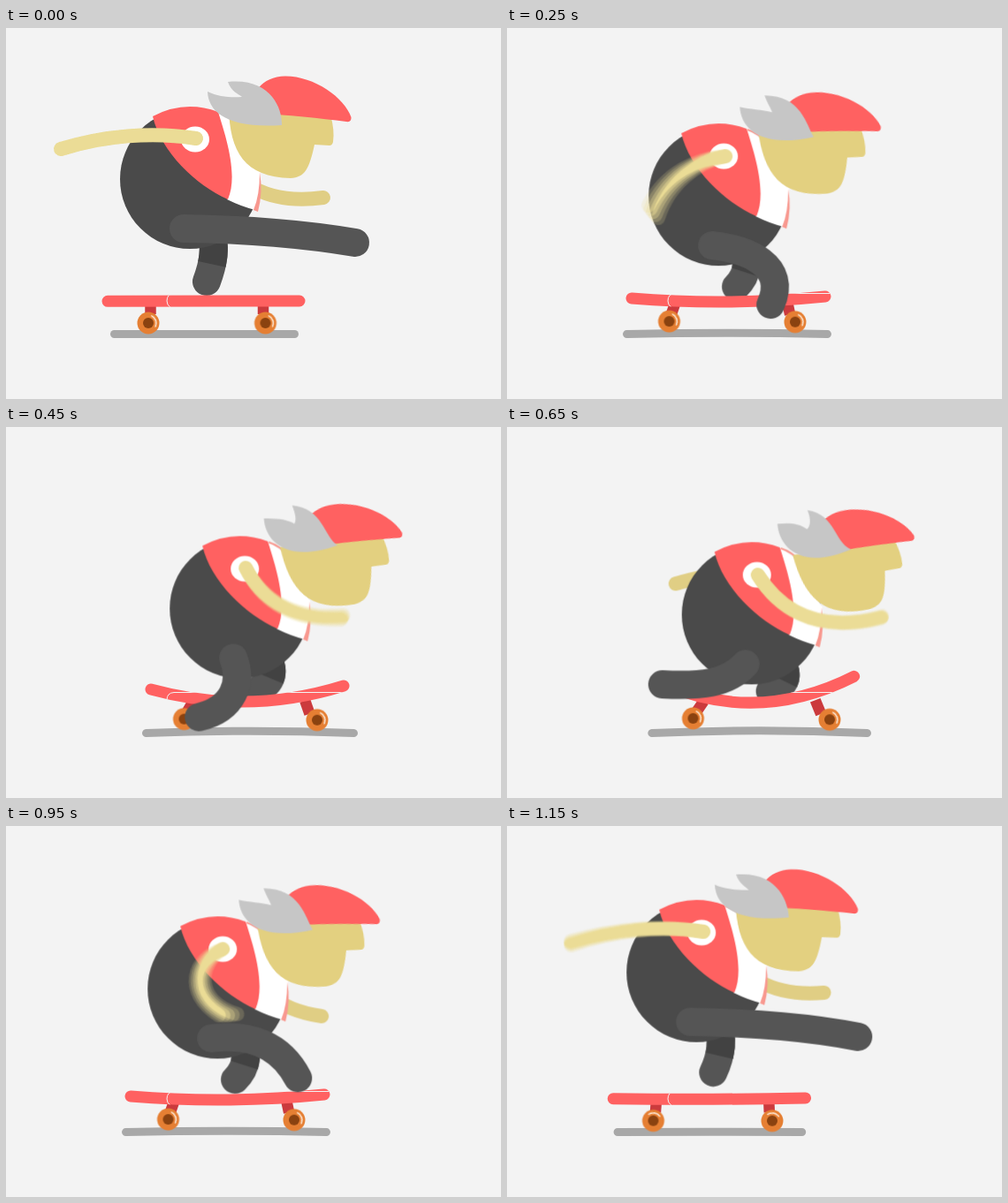
An HTML page without scripts for the animation above (1.2 s loop, 560x420 px).

```html
<!DOCTYPE html>
<html lang="en">
<head>
<meta charset="utf-8">
<title>Skater</title>
<style>
html, body { margin: 0; width: 100%; height: 100%; overflow: hidden; background: #f3f3f3; }
svg { display: block; width: 100%; height: 100%; }
.line { fill: none; stroke-linecap: round; }

/* Everything moves on a 50 ms beat: 12 beats out, 12 beats back. */
[class] { animation: 1.2s steps(12) -1ms infinite; }

.rig { animation-name: ride; }
@keyframes ride {
  0% { transform: translate(0, 0); }
  50% { transform: translate(75px, 46px); }
  100% { transform: translate(0, -10px); }
}

.head { animation-name: nod; transform-origin: 316px 87px; }
@keyframes nod {
  0%, 100% { transform: translateY(0) rotate(0deg); }
  50% { transform: translateY(-1.5px) rotate(-15deg); }
}

.hair { animation-name: hair; }
@keyframes hair {
  0%, 100% { d: path("M228,72 C229,95 250,114 312,110 C313,92 300,56 251,61 C255,72 262,74 267,78 C255,79 240,78 228,72Z"); }
  50% { d: path("M238,68 C240,95 265,122 321,96 C300,88 303,58 273,52 C277,62 276,70 271,74 C262,66 250,66 238,68Z"); }
}

.back-leg { animation-name: squat; }
@keyframes squat {
  0%, 100% { d: path("M232,230 C238,250 234,268 227,287"); }
  50% { d: path("M232,212 C254,232 252,250 229,255"); }
}

/* Copies spread by --k and added up give the arm its motion blur. */
.blur { isolation: isolate; }
.arm { animation-name: reach; transform-origin: 215px 126px; mix-blend-mode: plus-lighter; opacity: .2; }
@keyframes reach {
  0% { d: path("M215,125 C165,117 110,122 62,137"); transform: rotate(0deg); animation-timing-function: steps(3); }
  12.5% { d: path("M215,126 C172,120 122,133 88,160"); transform: rotate(calc(var(--k) * 3deg)); animation-timing-function: steps(2); }
  20.83% { d: path("M216,126 C185,130 150,150 134,189"); transform: rotate(calc(var(--k) * 5deg)); animation-timing-function: steps(2); }
  29.17% { d: path("M214,126 C200,152 200,192 240,203"); transform: rotate(calc(var(--k) * 6deg)); animation-timing-function: steps(2); }
  37.5% { d: path("M215,125 C230,155 260,185 324,181"); transform: rotate(calc(var(--k) * 1.5deg)); animation-timing-function: steps(3); }
  50% { d: path("M215,126 C236,158 278,195 359,172"); transform: rotate(0deg); animation-timing-function: steps(1); }
  54.17% { d: path("M215,126 C235,158 275,195 355,174"); transform: rotate(calc(var(--k) * .6deg)); animation-timing-function: steps(4); }
  70.83% { d: path("M214,126 C213,160 225,195 291,201"); transform: rotate(calc(var(--k) * 3deg)); animation-timing-function: steps(2); }
  79.17% { d: path("M214,126 C183,140 175,180 220,201"); transform: rotate(calc(var(--k) * 8deg)); animation-timing-function: steps(2); }
  87.5% { d: path("M215,126 C180,126 142,144 120,178"); transform: rotate(calc(var(--k) * 5deg)); animation-timing-function: steps(2); }
  95.83% { d: path("M216,125 C168,117 114,123 66,138"); transform: rotate(calc(var(--k) * 1deg)); animation-timing-function: steps(1); }
  100% { d: path("M215,125 C165,117 110,122 62,137"); transform: rotate(0deg); }
}

.back-arm { animation-name: swing; }
@keyframes swing {
  0%, 100% { d: path("M235,125 C255,180 300,200 359,192"); animation-timing-function: steps(5); }
  20.83% { d: path("M235,125 C225,165 225,195 255,205"); animation-timing-function: steps(4); }
  37.5% { d: path("M225,125 C190,130 165,155 160,190"); animation-timing-function: steps(3); }
  50% { d: path("M200,125 C170,121 140,127 114,133"); animation-timing-function: steps(1); }
  54.17% { d: path("M200,125 C170,122 145,130 122,136"); animation-timing-function: steps(4); }
  70.83% { d: path("M235,125 C225,165 225,195 255,205"); animation-timing-function: steps(2); }
  79.17% { d: path("M235,125 C240,165 275,195 326,202"); animation-timing-function: steps(5); }
}

.leg { animation-name: push; }
@keyframes push {
  0%, 100% { d: path("M201,227 C265,228 330,232 395,243"); animation-timing-function: steps(3); }
  12.5% { d: path("M201,227 C262,228 315,236 340,263"); animation-timing-function: steps(2); }
  20.83% { d: path("M201,227 C241,231 287,250 267,294"); animation-timing-function: steps(4); }
  37.5% { d: path("M201,227 C212,255 201,285 162,294"); animation-timing-function: steps(3); }
  50% { d: path("M201,227 C180,248 148,250 102,247"); animation-timing-function: steps(1); }
  54.17% { d: path("M201,227 C180,250 150,252 107,250"); animation-timing-function: steps(4); }
  70.83% { d: path("M202,227 C203,240 200,244 190,248"); animation-timing-function: steps(2); }
  79.17% { d: path("M201,227 C245,221 280,235 299,272"); animation-timing-function: steps(4); }
  95.83% { d: path("M201,227 C265,228 330,232 391,244"); animation-timing-function: steps(1); }
}

.deck { animation-name: flex; }
@keyframes flex {
  0%, 100% { d: path("M115,309.3 Q223,309 332,309"); animation-timing-function: steps(5); }
  20.83% { d: path("M141,306 Q250,315 360,304"); animation-timing-function: steps(4); }
  37.5%, 62.5% { d: path("M164,297 Q273,327 382,293"); animation-timing-function: steps(3); }
  50% { d: path("M180,287 Q289,343 398,277"); animation-timing-function: steps(3); }
  62.5% { animation-timing-function: steps(4); }
  79.17% { d: path("M141,306 Q250,315 360,304"); animation-timing-function: steps(5); }
}

.shadow { animation-name: shade; }
@keyframes shade {
  0%, 100% { d: path("M122.5,346.5 Q225,346.5 326.5,346.5"); animation-timing-function: steps(5); }
  20.83% { d: path("M135.5,346.5 Q249,344 362.5,346.5"); animation-timing-function: steps(4); }
  37.5%, 62.5% { d: path("M158.5,346.5 Q276,342 393.5,346.5"); animation-timing-function: steps(3); }
  50% { d: path("M166.5,346.5 Q290,340.5 414.5,346.5"); animation-timing-function: steps(3); }
  62.5% { animation-timing-function: steps(4); }
  79.17% { d: path("M135.5,346.5 Q249,344 362.5,346.5"); animation-timing-function: steps(5); }
}

.truck-l { animation-name: truck-l; }
@keyframes truck-l {
  0%, 100% { d: path("M163.5,312 L163.5,324"); }
  50% { d: path("M228,310 L217,325"); }
}
.truck-r { animation-name: truck-r; }
@keyframes truck-r {
  0%, 100% { d: path("M291,312 L291,324"); }
  50% { d: path("M354,309 L361,325"); }
}

.wheel-l { animation-name: wheel-l; }
@keyframes wheel-l {
  0%, 100% { transform: translate(161px, 334px); }
  50% { transform: translate(215px, 329.5px); }
}
.wheel-r { animation-name: wheel-r; }
@keyframes wheel-r {
  0%, 100% { transform: translate(293.5px, 334px); }
  50% { transform: translate(371.5px, 331px); }
}
.shine { animation-name: spin; animation-timing-function: steps(1); }
@keyframes spin {
  0%, 100% { transform: rotate(30deg); }
  4.17%, 95.83% { transform: rotate(-45deg); }
  37.5%, 62.5% { transform: rotate(-105deg); }
}

.wind { animation-name: wind; visibility: hidden; }
@keyframes wind {
  0%, 58.3% { transform: translate(560px, 0); visibility: hidden; animation-timing-function: steps(1); }
  58.33% { transform: translate(420px, 0); visibility: visible; animation-timing-function: steps(3); }
  70.83% { transform: translate(0, 0); visibility: visible; animation-timing-function: steps(1); }
  75%, 100% { transform: translate(-140px, 0); visibility: hidden; }
}
</style>
</head>
<body>
<svg viewBox="0 0 560 420">
  <defs>
    <g id="wheel">
      <circle r="12.5" fill="#e57f33"/>
      <path class="line shine" d="M8.4,-3 A9,9 0 0 1 3,8.4" stroke="#fbe6d2" stroke-width="1.6"/>
      <circle r="6" fill="#8a4210"/>
    </g>
    <mask id="on-deck" maskUnits="userSpaceOnUse" x="0" y="0" width="560" height="420">
      <path class="line deck" stroke="#fff" stroke-width="13"/>
    </mask>
  </defs>

  <path class="wind" d="M-75,181.5H35 M-62,194.5H48 M-82,207.5H28" stroke="#fafafa" stroke-width="5"/>
  <path class="line shadow" stroke="#a8a8a8" stroke-width="9"/>

  <g class="rig">
    <path class="line back-arm" stroke="#e0ce84" stroke-width="16"/>
    <path class="line back-leg" stroke="#555" stroke-width="32"/>
    <path class="back-leg" fill="none" stroke="#424242" stroke-width="32" pathLength="1" stroke-dasharray=".65 1"/>
    <circle cx="208" cy="171" r="79" fill="#4a4a4a"/>
    <path d="M240,95 L262,111 L288,163 Q290,185 282,206 Q266,202 250,194Z" fill="#fff"/>
    <path d="M287,163 Q291,185 285,208 L280,206 Q287,190 287,163Z" fill="#f8988f"/>
    <path d="M241,96 Q254,100 264,112" fill="none" stroke="#f8988f" stroke-width="2"/>
    <path d="M166,100 Q202,81 240,95 C246,115 264,165 251,194 C215,178 175,140 166,100Z" fill="#ff6161"/>
    <g class="head">
      <path d="M252,90 C253,140 270,169 322,170 C338,169 343,160 349,132 L366,133 Q369,133 370,129 Q372,116 367,98Z" fill="#e3d080"/>
      <path d="M280,96 C275,75 289,55 316,54.5 C349,54.5 383,79 390.5,101 Q391,107 385,106 Q340,100 280,96Z" fill="#ff6161"/>
    </g>
    <path class="hair" fill="#c6c6c6"/>
    <ellipse cx="214" cy="126" rx="16" ry="14.5" fill="#fff"/>
  </g>

  <g fill="none" stroke="#cb3a3d" stroke-width="12.5">
    <path class="truck-l"/>
    <path class="truck-r"/>
  </g>
  <path class="line deck" stroke="#ff6161" stroke-width="13"/>
  <g mask="url(#on-deck)">
    <path d="M480,300.5 H190 Q182,301 182,309 Q182,314 186,316" fill="none" stroke="#f3f3f3"/>
  </g>
  <use href="#wheel" class="wheel-l"/>
  <use href="#wheel" class="wheel-r"/>

  <g class="rig">
    <path class="line leg" stroke="#555" stroke-width="32"/>
    <g class="blur" stroke="#eadb92" stroke-width="16">
      <path class="line arm" style="--k:-1"/>
      <path class="line arm" style="--k:-.5"/>
      <path class="line arm" style="--k:0"/>
      <path class="line arm" style="--k:.5"/>
      <path class="line arm" style="--k:1"/>
    </g>
  </g>
</svg>
</body>
</html>
```
